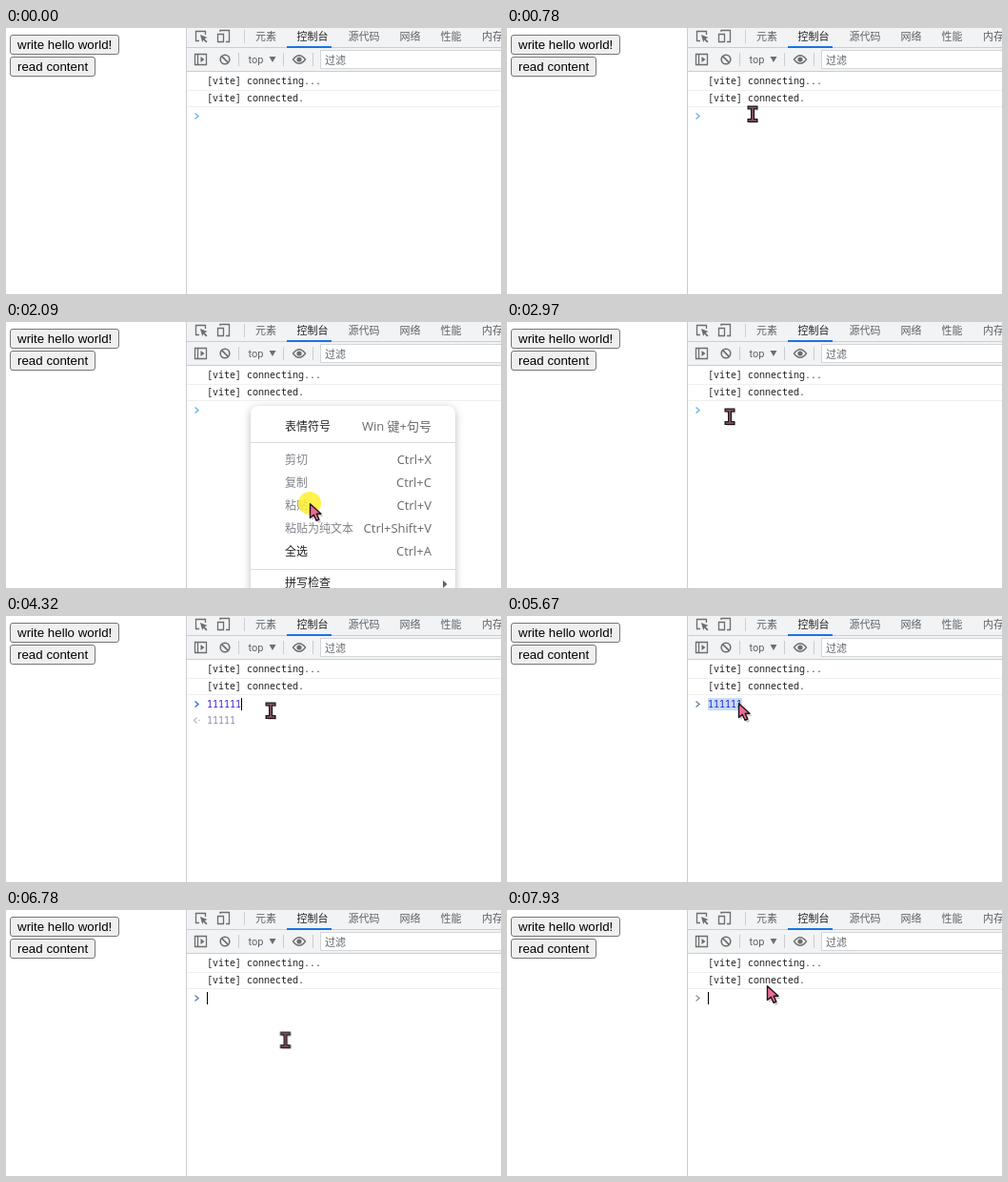
Animation, 520 px wide and 279 px high, one loop 8 s. Source, as an HTML page:

```html
<!DOCTYPE html>
<html lang="zh-CN">
<head>
<meta charset="utf-8">
<title>Console paste</title>
<style>
html, body { margin: 0; width: 100%; height: 100%; overflow: hidden; background: #fff; }
svg { display: block; width: 520px; height: 279px; }
text { white-space: pre; }
.page { font: 13.333px "Liberation Sans", Arial, sans-serif; fill: #000; }
.ui { font: 11px Roboto, "Noto Sans CJK SC", "Noto Sans CJK", sans-serif; fill: #5f6368; }
.on { fill: #202124; }
.log { font: 10px "Noto Sans Mono", "DejaVu Sans Mono", monospace; fill: #202124; }
.label { font: 12px "Open Sans", "Noto Sans CJK SC", "Noto Sans CJK", sans-serif; fill: #202124; }
.key { font-size: 13px; fill: #66696d; text-anchor: end; }
.off { fill: #80838a; }
.icon { fill: none; stroke: #6e6e6e; stroke-width: 1.3; }
.sep { fill: #cacdd1; }
.panel { fill: #fff; filter: drop-shadow(0 2px 4px #0004); }

.step { animation: 8s step-end infinite; }
#menu1, #menu2 { animation: menu1 8s linear infinite; }
#menu2 { animation-name: menu2; }
#prompt { animation-name: prompt; fill: none; stroke-width: 1.5; }
#select { animation-name: select; }
#typed { animation-name: typed; }
#echo { animation-name: echo; }
#echoed { animation-name: echoed; }
#caret { animation-name: caret; }
#caretAt { animation-name: caretAt; }
#cursor { animation: move 8s ease-in-out infinite; }
#seen { animation-name: seen; }
#arrow { animation-name: arrow; }
#beam { animation-name: beam; }
#click { animation-name: click; }

@keyframes menu1 {
  0%, 15.7% { opacity: 0 } 17.5%, 31% { opacity: 1 } 32.7%, 100% { opacity: 0 }
}
@keyframes menu2 {
  0%, 71.7% { opacity: 0 } 73.5%, 81.2% { opacity: 1 } 82.7%, 100% { opacity: 0 }
}
@keyframes prompt {
  0% { stroke: #70b9e6 } 44.5% { stroke: #3679cf }
  63.2% { stroke: #6589b0 } 95.7%, 100% { stroke: #9a9a9a }
}
@keyframes select {
  0% { opacity: 0 } 63.2% { opacity: 1 } 82%, 100% { opacity: 0 }
}
@keyframes typed {
  0% { transform: none }
  49.7% { transform: translateX(6px) }
  50.6% { transform: translateX(12px) }
  51.5% { transform: translateX(18px) }
  52.3% { transform: translateX(24px) }
  53.1% { transform: translateX(30px) }
  53.9% { transform: translateX(38px) }
  82%, 100% { transform: none }
}
@keyframes echo {
  0% { opacity: 0 } 50.6% { opacity: 1 } 63.2%, 100% { opacity: 0 }
}
@keyframes echoed {
  0% { transform: translateX(6px) }
  51.5% { transform: translateX(12px) }
  52.3% { transform: translateX(18px) }
  53.1% { transform: translateX(24px) }
  53.9% { transform: translateX(30px) }
  54.8%, 100% { transform: translateX(38px) }
}
@keyframes caretAt {
  0% { transform: none }
  49.7% { transform: translateX(6px) }
  50.6% { transform: translateX(12px) }
  51.5% { transform: translateX(18px) }
  52.3% { transform: translateX(24px) }
  53.1% { transform: translateX(30px) }
  53.9% { transform: translateX(36px) }
  63.2%, 100% { transform: none }
}
@keyframes caret {
  0% { opacity: 0 } 2.4% { opacity: 1 } 8.6% { opacity: 0 }
  14.8% { opacity: 1 } 16.6% { opacity: 0 }
  32% { opacity: 1 } 34.2% { opacity: 0 }
  40.5% { opacity: 1 } 46.7% { opacity: 0 }
  49.7% { opacity: 1 } 60.2% { opacity: 0 }
  73.7% { opacity: 1 } 79.4% { opacity: 0 }
  82% { opacity: 1 } 88.2% { opacity: 0 }
  95.7%, 100% { opacity: 1 }
}
@keyframes move {
  0%, .8% { transform: translate(365px, 205px) }
  8% { transform: translate(262px, 86px) }
  9.7%, 14.8% { transform: translate(258px, 90px) }
  15.7%, 18% { transform: translate(257px, 88px) }
  24.3%, 27% { transform: translate(319px, 190px) }
  31% { transform: translate(232px, 96px) }
  34.6%, 36% { transform: translate(228px, 95px) }
  37.1%, 42.9% { transform: translate(234px, 99px) }
  44.5%, 49.7% { transform: translate(252px, 97px) }
  54% { transform: translate(278px, 99px) }
  55.6% { transform: translate(283px, 99px) }
  58.3%, 65.8% { transform: translate(240px, 93px) }
  67.5%, 71.7% { transform: translate(243px, 91px) }
  75.5%, 77.7% { transform: translate(311px, 198px) }
  79.5%, 82% { transform: translate(300px, 150px) }
  88.2%, 90.7% { transform: translate(284px, 116px) }
  93.2%, 95.7% { transform: translate(293px, 92px) }
  99%, 100% { transform: translate(273px, 79px) }
}
@keyframes seen { 0% { opacity: 0 } .8%, 100% { opacity: 1 } }
@keyframes arrow {
  0% { opacity: 1 } 6.5% { opacity: 0 } 15.7% { opacity: 1 } 32% { opacity: 0 }
  69.9% { opacity: 1 } 75.2% { opacity: .7 } 77.7% { opacity: 1 }
  83.5% { opacity: 0 } 97.5%, 100% { opacity: 1 }
}
@keyframes beam {
  0% { opacity: 0 } 6.5% { opacity: 1 } 15.7% { opacity: 0 } 32% { opacity: 1 }
  69.9% { opacity: 0 } 83.5% { opacity: 1 } 97.5%, 100% { opacity: 0 }
}
@keyframes click {
  0% { opacity: 0 } 25.2% { opacity: .85 } 27% { opacity: 0 }
  31% { opacity: .85 } 32% { opacity: 0 }
  44.7% { opacity: .85 } 46.5% { opacity: 0 }
  60% { opacity: .85 } 61.6% { opacity: 0 }
  62.5% { opacity: .85 } 64.1% { opacity: 0 }
  79.7% { opacity: .85 } 81.2%, 100% { opacity: 0 }
}
</style>
</head>
<body>
<svg viewBox="0 0 520 279">
  <rect width="520" height="279" fill="#fff"/>

  <g fill="#efefef" stroke="#767676">
    <rect x="4.5" y="7.5" width="114" height="20" rx="2.5"/>
    <rect x="4.5" y="30.5" width="89" height="20" rx="2.5"/>
  </g>
  <text class="page" x="12" y="22">write hello world!</text>
  <text class="page" x="12" y="45">read content</text>

  <rect x="190" width="330" height="45" fill="#f1f3f4"/>
  <g class="sep">
    <rect x="189" width="1" height="279"/>
    <rect x="190" y="20" width="330" height="1"/>
    <rect x="190" y="45" width="330" height="1"/>
    <rect x="250" y="2" width="1" height="14"/>
    <rect x="244" y="26" width="1" height="14"/>
    <rect x="291" y="26" width="1" height="14"/>
    <rect x="322" y="26" width="1" height="14"/>
  </g>
  <rect x="295" y="19" width="47" height="2" fill="#1a73e8"/>
  <rect x="330.5" y="23.5" width="200" height="19" fill="#fff" stroke="#d3d6d9"/>
  <g class="ui">
    <text x="262" y="13">元素</text>
    <text x="305.500" y="13" class="on">控制台</text>
    <text x="359.500" y="13">源代码</text>
    <text x="413.500" y="13">网络</text>
    <text x="456.500" y="13">性能</text>
    <text x="500" y="13">内存</text>
    <text x="254.500" y="37">top</text>
    <text x="335" y="38">过滤</text>
  </g>
  <g class="icon">
    <path d="M203 13.500H199.500V3.500H209.500V7"/>
    <path d="M225 4V2.500H234.500V14.500H231M222.500 6.500H228.500V14.500H222.500Z"/>
    <path d="M198.500 27.500H210.500V38.500H198.500ZM201.500 27.500V38.500"/>
    <circle cx="230" cy="33" r="4.800" stroke-width="1.600"/>
    <path d="M226.600 29.600L233.400 36.400" stroke-width="1.600"/>
    <path d="M301.500 33Q308 24.500 314.500 33Q308 41.500 301.500 33Z"/>
  </g>
  <g fill="#6e6e6e">
    <path d="M204 7L211.500 10L208.700 11.200L211.500 14.200L210.200 15.400L207.400 12.500L206.200 15Z"/>
    <path d="M204.500 30L208.500 33L204.500 36ZM276.500 30H283.500L280 36Z"/>
    <circle cx="308" cy="33" r="2.600"/>
  </g>

  <g fill="#efefef">
    <rect x="190" y="65" width="330" height="1"/>
    <rect x="190" y="82" width="330" height="1"/>
  </g>
  <text class="log" x="211" y="59">[vite] connecting...</text>
  <text class="log" x="211" y="77">[vite] connected.</text>

  <path id="prompt" class="step" d="M198.500 89.500L202 92.500L198.500 95.500"/>
  <rect id="select" class="step" x="211" y="86" width="36" height="13" fill="#c5defa"/>
  <text class="log" x="211" y="96" style="fill:#2a14d0">111111</text>
  <rect id="typed" class="step" x="211" y="85" width="40" height="15" fill="#fff"/>
  <g id="echo" class="step">
    <path d="M200.500 106.500L197.500 109.500L200.500 112.500" fill="none" stroke="#bbb" stroke-width="1.200"/>
    <circle cx="203" cy="109.500" r=".8" fill="#bbb"/>
    <text class="log" x="211" y="113" style="fill:#8983a5">111111</text>
    <rect id="echoed" class="step" x="211" y="102" width="40" height="15" fill="#fff"/>
  </g>
  <g id="caretAt" class="step">
    <rect id="caret" class="step" x="211" y="86" width="1" height="13"/>
  </g>

  <g id="menu1"></g>
  <g id="menu2"></g>

  <g id="cursor">
    <g id="seen" class="step">
      <circle id="click" class="step" r="12" fill="#fff02e"/>
      <g id="arrow" class="step">
        <path d="M2 3V18L6 15L9 21L12 19.500L9.500 14H14.500Z" fill="#0003"/>
        <path d="M.5 .8V15.500L4.300 12.300L7 18.300L9.800 17L7.200 11.300H12Z" fill="#ec6d97" stroke="#221318" stroke-width="1.400" stroke-linejoin="round"/>
      </g>
      <g id="beam" class="step" fill="none">
        <path d="M-3 -5H6M1.500 -5V8M-3 8H6" stroke="#0002" stroke-width="4"/>
        <path d="M-5.500 -6.500H5.500M0 -6.500V7M-5.500 7H5.500" stroke="#1d1418" stroke-width="4"/>
        <path d="M-4.300 -6.500H4.300M0 -6.500V7M-4.300 7H4.300" stroke="#8d5a68" stroke-width="1.600"/>
      </g>
    </g>
  </g>
</svg>
<script>
const rows = [
  ['表情符号', 'Win 键+句号', 22],
  ['剪切', 'Ctrl+X', 57],
  ['复制', 'Ctrl+C', 81],
  ['粘贴', 'Ctrl+V', 105],
  ['粘贴为纯文本', 'Ctrl+Shift+V', 129],
  ['全选', 'Ctrl+A', 153]
];

function buildMenu(id, x, y, width, keyEnd, disabled, last, extra = '') {
  const items = rows.map(([label, key, dy], i) =>
    `<text class="label ${disabled.includes(i) ? 'off' : ''}" x="36" y="${dy + 4}">${label}</text>` +
    `<text class="label key" x="${keyEnd}" y="${dy + 4}">${key}</text>`).join('');
  const lines = [38, 171].map(dy =>
    `<rect y="${dy}" width="${width}" height="1" fill="#dadce0"/>`).join('');
  document.getElementById(id).innerHTML =
    `<g transform="translate(${x} ${y})">
      <rect class="panel" width="${width}" height="260" rx="8"/>
      ${lines}${items}<text class="label" x="36" y="190">${last}</text>${extra}
    </g>`;
}

buildMenu('menu1', 257, 88, 215, 190, [1, 2, 3, 4], '拼写检查',
  '<path d="M202 183L206.500 187L202 191Z" fill="#5f6368"/>');
buildMenu('menu2', 242, 90, 309, 284, [3, 4], '使用Tavilo搜索“111111”');
</script>
</body>
</html>
```
